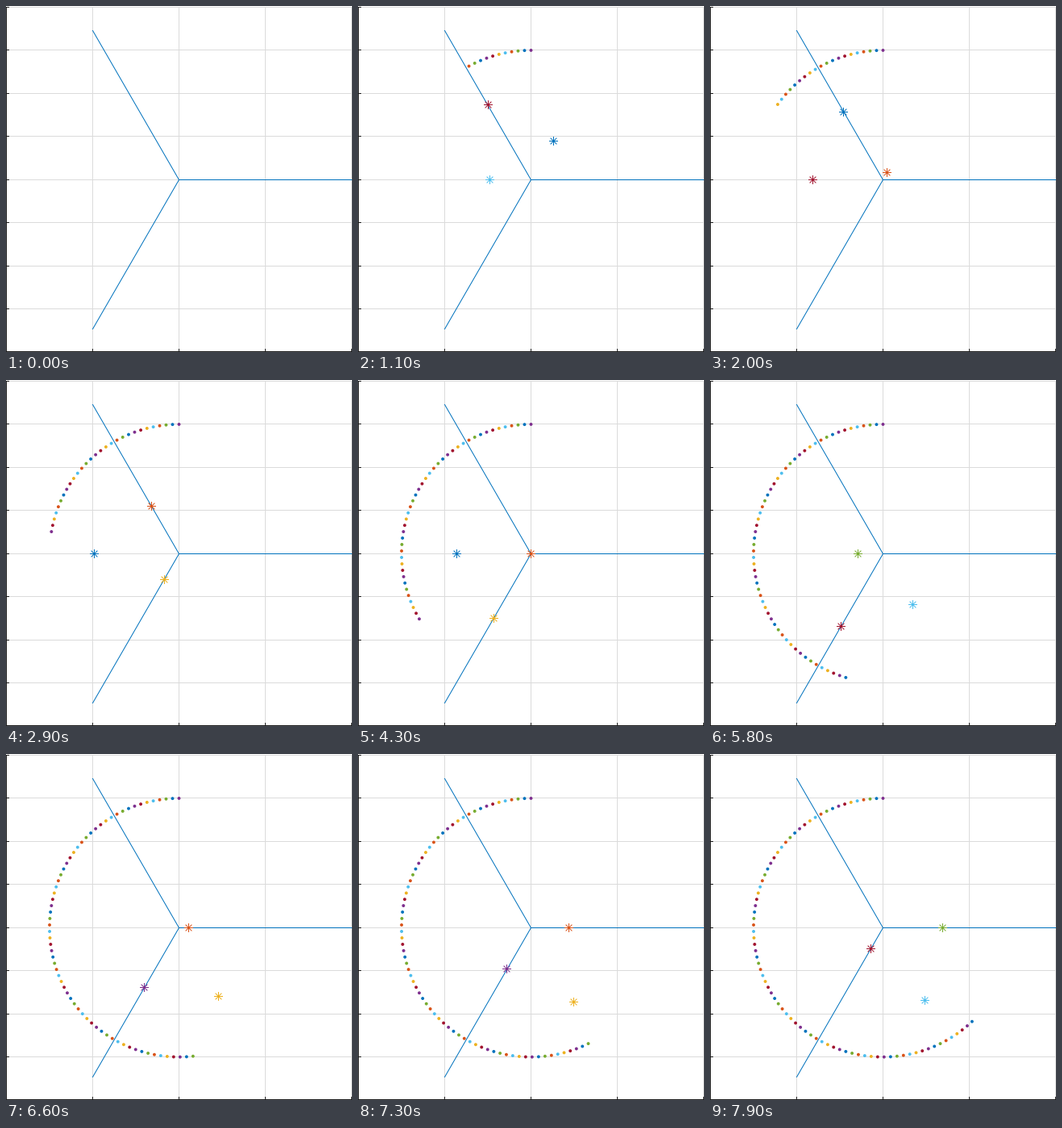
A matplotlib script that plays this animation: 429 px wide and 429 px high, repeating every 8000 ms.

```python
import numpy as np
import matplotlib.pyplot as plt
from matplotlib.animation import FuncAnimation

SIZE, DPI = 429, 78
PX = 72 / DPI                      # one pixel in points
CX, CY = 214.0, 214.8              # origin in pixels
SX, SY = 107.0, 106.9              # pixels per unit
FRAMES, INTERVAL = 80, 100
STEP = 0.05                        # radians per frame

COLORS = ["#0072bd", "#d95319", "#edb120", "#7e2f8e",
          "#77ac30", "#4dbeee", "#a2142f"]
AXIS, GRID = "#1c1c1c", "#dbdbdb"
PHASES = np.array([0, 2 * np.pi / 3, 4 * np.pi / 3])


def to_px(r, angle):
    return CX + SX * r * np.cos(angle), CY - SY * r * np.sin(angle)


fig = plt.figure(figsize=(SIZE / DPI, SIZE / DPI), dpi=DPI, facecolor="white")
ax = fig.add_axes([0, 0, 1, 1])
ax.set_xlim(-0.5, SIZE - 0.5)
ax.set_ylim(SIZE - 0.5, -0.5)
ax.axis("off")


def line(x, y, color, z):
    return ax.plot(x, y, color=color, lw=PX, snap=False, zorder=z)[0]


# Grid, ticks and axes
LAST = SIZE - 1
for v in np.arange(-2, 2.1, 1):
    x = round(CX + SX * v)
    line([x, x], [1, LAST], GRID, 1)
    line([x, x], [LAST - 3, LAST], AXIS, 2)
for v in np.arange(-2, 2.1, 0.5):
    y = min(round(CY - SY * v), LAST)
    line([0, LAST], [y, y], GRID, 1)
    line([0, 3], [y, y], AXIS, 2)
line([0, 0], [1, LAST], AXIS, 2)
line([0, LAST], [LAST, LAST], AXIS, 2)

# Phase axes
for p in PHASES:
    x, y = to_px(2, p)
    line([CX, x], [round(CY), round(y)], COLORS[0], 3)

# Eight-armed star: four strokes separated by gaps
STAR_X, STAR_Y = [], []
for a in np.arange(4) * np.pi / 4:
    dx, dy = 5 * np.cos(a), 5 * np.sin(a)
    STAR_X += [-dx, dx, np.nan]
    STAR_Y += [-dy, dy, np.nan]
STAR_X, STAR_Y = np.array(STAR_X), np.array(STAR_Y)

stars = [line([], [], COLORS[0], 5) for _ in PHASES]
trail = ax.scatter([], [], s=(3.9 * PX) ** 2, linewidths=0, zorder=4)


def update(n):
    # Dots: the vector sum, 1.5 times the phase amplitude
    k = np.arange(n)
    x, y = to_px(1.5, np.pi / 2 + STEP * k)
    trail.set_offsets(np.column_stack([x, y]))
    trail.set_facecolor([COLORS[(4 * i + 3) % 7] for i in k])

    # Stars: each phase value along its own axis
    theta = np.pi / 2 + STEP * (n - 1)
    for i, (star, p) in enumerate(zip(stars, PHASES)):
        star.set_visible(n > 0)
        x, y = to_px(np.cos(theta - p), p)
        star.set_data(round(x) + STAR_X, round(y) + STAR_Y)
        star.set_color(COLORS[(4 * (n - 1) + i) % 7])
    return [trail, *stars]


anim = FuncAnimation(fig, update, frames=FRAMES, interval=INTERVAL,
                     init_func=lambda: update(0), repeat=True,
                     repeat_delay=0, blit=False)
plt.show()
```
